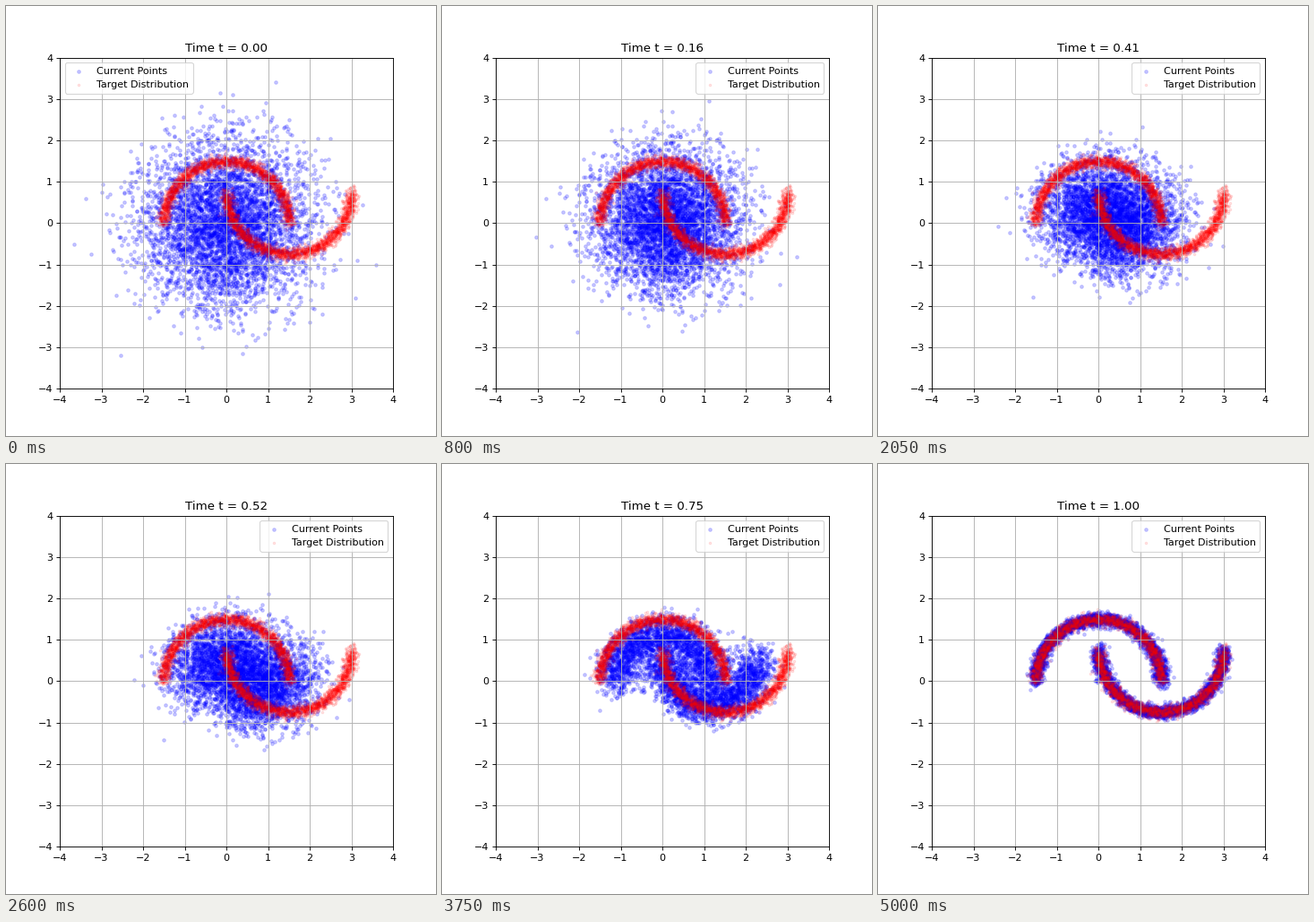
A matplotlib script that plays this animation: 480x480 px, repeating every 5050 ms.

```python
import numpy as np
import matplotlib.pyplot as plt
from matplotlib.animation import FuncAnimation

N = 5000
STEPS = 100
SPREAD = 0.085   # width of the moons reached by the flow
SOFT = 0.004     # extra blur that leaves a few stragglers between the moons

rng = np.random.default_rng(7)


def moons(n):
    a = np.linspace(0, np.pi, n)
    upper = np.column_stack([np.cos(a), np.sin(a)])
    lower = np.column_stack([1 - np.cos(a), 0.5 - np.sin(a)])
    return 1.5 * np.vstack([upper, lower])


def start_cloud():
    far = np.array([
        (-3.65, -0.5), (-3.37, 0.6), (-3.24, -0.75), (-2.97, 0.95),
        (-3.0, 0.75), (3.6, -1.0), (3.27, 0.45), (3.1, -1.8),
        (3.15, -0.9), (-2.53, -3.2), (1.19, 3.41), (-0.15, 3.14),
        (0.16, 3.1), (0.38, -3.15), (0.47, -2.97), (-0.57, -3.0),
        (2.0, -2.4), (2.3, -2.2), (2.2, 2.05), (2.5, 2.05),
        (-2.65, -1.75), (-1.55, 2.55), (-1.25, 2.6), (0.95, 2.9),
    ])
    pts = rng.normal(size=(2 * N, 2))
    pts = pts[np.hypot(*pts.T) < 2.95]
    return np.vstack([far, pts])[:N]


def velocity(x, t, centres):
    """Mean velocity of straight paths from a Gaussian to the moons."""
    var = (1 - t) ** 2 + (t * SPREAD) ** 2
    m = t * centres
    d2 = (x ** 2).sum(1)[:, None] - 2 * x @ m.T + (m ** 2).sum(1)
    w = np.exp(-(d2 - d2.min(1, keepdims=True)) / (2 * (var + SOFT)))
    mean = w @ centres / w.sum(1, keepdims=True)
    rate = (t * SPREAD ** 2 - (1 - t)) / var
    return mean + rate * (x - t * mean)


def flow():
    centres = moons(40)
    path = [start_cloud()]
    for k in range(STEPS):
        x = path[-1]
        path.append(x + velocity(x, (k + 0.5) / STEPS, centres) / STEPS)
    return path


path = flow()
goal = moons(N // 2) + rng.normal(scale=0.075, size=(N, 2))

fig, ax = plt.subplots(figsize=(6, 6), dpi=80)
cloud = ax.scatter(*path[0].T, s=10, c="blue", alpha=0.2,
                   label="Current Points")
ax.scatter(*goal.T, s=5, c="red", alpha=0.1, label="Target Distribution")
ax.set(xlim=(-4, 4), ylim=(-4, 4))
ax.grid(True)
title = ax.set_title("Time t = 0.00")
legend = ax.legend(loc="upper left")


def update(k):
    t = k / STEPS
    cloud.set_offsets(path[k])
    title.set_text(f"Time t = {t:.2f}")
    legend.set_loc("upper left" if t < 0.11 else "upper right")
    return cloud, title, legend


anim = FuncAnimation(fig, update, frames=STEPS + 1, interval=50,
                     repeat=True, repeat_delay=0, blit=False)
plt.show()
```
